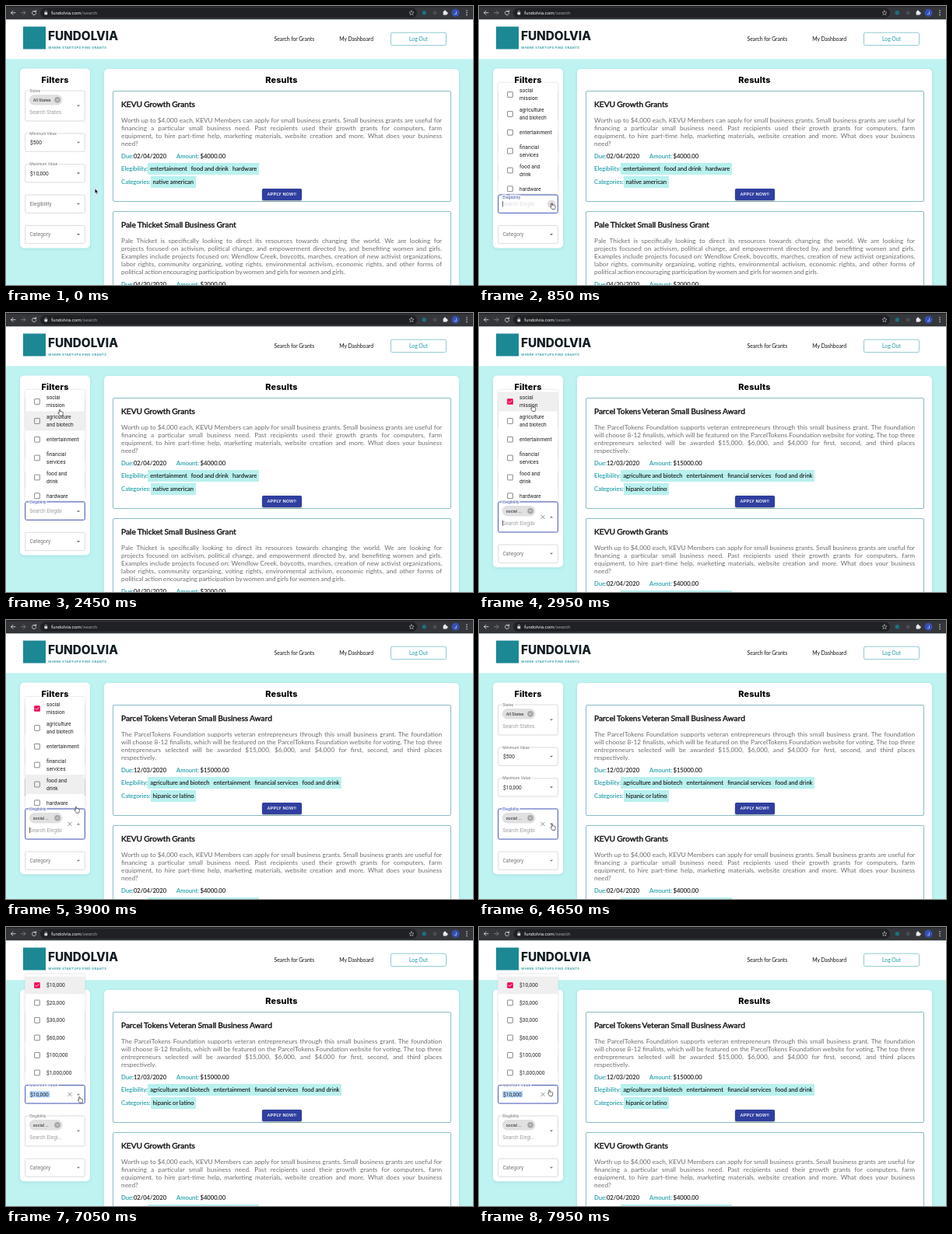
Animation of 600x359 px, one loop 8 s. Source, as an HTML page:

```html
<!DOCTYPE html>
<html lang="en">
<head>
<meta charset="utf-8">
<title>Grant search</title>
<style>
  html, body { margin: 0; width: 100%; height: 100%; overflow: hidden; }
  #stage { position: relative; width: 600px; height: 359px; overflow: hidden; background: #bff3f2; font-family: Lato, sans-serif; }
  #stage svg { position: absolute; left: 0; top: 0; }
  .panel { position: absolute; left: 126px; top: 80.5px; width: 456px; height: 300px; border-radius: 5px; background: #fff; box-shadow: 0 1px 4px rgba(40, 130, 140, .16); }
  .card { position: absolute; left: 137px; width: 434.5px; box-sizing: border-box; border: 1px solid #8abac6; border-radius: 2px; }
  .card > * { position: absolute; left: 10.1px; white-space: nowrap; }
  .card h2 { margin: 0; top: 9.8px; font-size: 10.2px; font-weight: 400; line-height: 12px; word-spacing: -.5px; color: #111; -webkit-text-stroke: .4px #111; }
  .copy { top: 31.8px; width: 412px; font-size: 8.25px; line-height: 10px; word-spacing: -.6px; color: #6c6c6c; }
  .copy div { text-align: justify; text-align-last: justify; }
  .copy div:last-child { text-align-last: left; }
  .row { font-size: 7.6px; line-height: 9px; word-spacing: -.2px; color: #111; -webkit-text-stroke: .08px; }
  .row b { font-weight: 400; color: #179aa5; }
  .tags { display: flex; line-height: 14.6px; }
  .tags span { background: #b8f1ef; padding: 0 .4px; }
  .tags i { font-style: normal; margin: 0 2.6px; }
  .card .apply { left: 191px; width: 50.5px; height: 15px; border-radius: 1.8px; background: #303f9f; color: #fff; font: 500 5.9px/15px Roboto, sans-serif; letter-spacing: .18px; text-align: center; box-shadow: 0 1px 2px rgba(0, 0, 0, .35); }
</style>
</head>
<body>
<div id="stage">
  <div class="panel"></div>
  <div id="before"></div>
  <div id="after"></div>
  <svg id="page" width="600" height="359"></svg>
  <svg id="live" width="600" height="359"></svg>
</div>
<script>
const LOOP = 8000;
const OPEN = 850, PICK = 2700, CLOSE = 4400, OPEN_MAX = 6900;
const HOVER_LAG = 100;
const INK = '#212121', GREY = '#757575', BLUE = '#3f51b5', TEAL = '#1b9ba5';
const ROBOTO = 'Roboto, sans-serif', LATO = 'Lato, sans-serif', INTER = 'Inter, sans-serif';
const $ = id => document.getElementById(id);

// Results

const growth = {
  title: 'KEVU Growth Grants', due: '02/04/2020', amount: '$4000.00',
  copy: ['Worth up to $4,000 each, KEVU Members can apply for small business grants. Small business grants are useful for',
    'financing a particular small business need. Past recipients used their growth grants for computers, farm',
    'equipment, to hire part-time help, marketing materials, website creation and more. What does your business',
    'need?'],
  who: ['entertainment', 'food and drink', 'hardware'], category: 'native american'
};
const thicket = {
  title: 'Pale Thicket Small Business Grant', due: '04/20/2020', amount: '$2000.00',
  copy: ['Pale Thicket is specifically looking to direct its resources towards changing the world. We are looking for',
    'projects focused on activism, political change, and empowerment directed by, and benefiting women and girls.',
    'Examples include projects focused on: Wendlow Creek, boycotts, marches, creation of new activist organizations,',
    'labor rights, community organizing, voting rights, environmental activism, economic rights, and other forms of',
    'political action encouraging participation by women and girls for women and girls.'],
  who: ['social mission'], category: 'women'
};
const veteran = {
  title: 'Parcel Tokens Veteran Small Business Award', due: '12/03/2020', amount: '$15000.00',
  copy: ['The ParcelTokens Foundation supports veteran entrepreneurs through this small business grant. The foundation',
    'will choose 8-12 finalists, which will be featured on the ParcelTokens Foundation website for voting. The top three',
    'entrepreneurs selected will be awarded $15,000, $6,000, and $4,000 for first, second, and third places',
    'respectively.'],
  who: ['agriculture and biotech', 'entertainment', 'financial services', 'food and drink'], category: 'hipanic or latino'
};

function card(g, top) {
  const y = g.copy.length * 10;
  const tags = (name, list, at) => `<div class="row tags" style="top:${y + at}px"><b>${name}:</b><span>${
    list.map(w => `<i>${w}</i>`).join('')}</span></div>`;
  return `<div class="card" style="top:${top}px;height:${y + 102.7}px"><h2>${g.title}</h2>
    <div class="copy">${g.copy.map(s => `<div>${s}</div>`).join('')}</div>
    <div class="row" style="top:${y + 39.2}px"><b>Due:</b>${g.due}</div>
    <div class="row" style="top:${y + 39.2}px;left:81.1px"><b>Amount:</b> ${g.amount}</div>
    ${tags('Elegibility', g.who, 52.2)}${tags('Categories', [g.category], 69.2)}
    <div class="apply" style="top:${y + 84.8}px">APPLY NOW!!</div></div>`;
}
$('before').innerHTML = card(growth, 109) + card(thicket, 264.3);
$('after').innerHTML = card(veteran, 109) + card(growth, 264.3);

// SVG helpers

const text = (x, y, s, size, fill = INK, font = ROBOTO, extra = '') =>
  `<text x="${x}" y="${y}" font-size="${size}" fill="${fill}" font-family="${font}" ${extra}>${s}</text>`;
const rect = (x, y, w, h, fill, r = 0, extra = '') =>
  `<rect x="${x}" y="${y}" width="${w}" height="${h}" rx="${r}" fill="${fill}" ${extra}/>`;
const circle = (x, y, r, fill, extra = '') => `<circle cx="${x}" cy="${y}" r="${r}" fill="${fill}" ${extra}/>`;
const line = (d, color, w = .8) =>
  `<path d="${d}" fill="none" stroke="${color}" stroke-width="${w}" stroke-linecap="round" stroke-linejoin="round"/>`;
const cross = (x, y, r, color, w) =>
  line(`M${x - r} ${y - r}l${2 * r} ${2 * r}m0 ${-2 * r}l${-2 * r} ${2 * r}`, color, w);

// Browser bar and header

const bar = rect(0, 0, 600, 17.5, '#35363a') + rect(0, 0, 600, 1.2, '#202124') + rect(44, 2.6, 484, 12.4, '#202124', 6.2) +
  line('M12 8.7H6.5M9 6.2L6.5 8.7L9 11.2', '#e8eaed') +
  line('M19.5 8.7H25M22.5 6.2L25 8.7L22.5 11.2', '#85888c') +
  line('M38.2 7.3A2.6 2.6 0 1 0 38.7 9.3M38.6 5.6V7.5H36.7', '#e8eaed') +
  rect(49.4, 8, 3.8, 3.2, '#d5d7da', .4) + line('M50.2 8V7.2a1.1 1.1 0 0 1 2.2 0V8', '#d5d7da', .6) +
  text(58, 11, 'fundolvia.com<tspan fill="#9aa0a6">/search</tspan>', 6.1, '#f1f3f4') +
  line('M521 5.8L521.9 7.8L524 8L522.4 9.4L522.9 11.5L521 10.4L519.1 11.5L519.6 9.4L518 8L520.1 7.8Z', '#c8cacd', .6) +
  circle(537.3, 8.7, 2.7, '#1d6f80') + circle(551, 8.7, 2.5, '#4a4d52') +
  rect(561.7, 7, 4.8, 4.6, '#e8eaed', .6) + circle(564, 6.6, 1.2, '#e8eaed') + circle(566.8, 9.3, 1.1, '#e8eaed') +
  circle(577.5, 8.7, 5, '#3550b5') + text(577.5, 10.8, 'J', 5.8, '#fff', ROBOTO, 'text-anchor="middle"') +
  [6, 8.7, 11.4].map(y => circle(592, y, .75, '#e8eaed')).join('');

const nav = (x, s, color = '#111', extra = '') => text(x, 45, s, 6.85, color, LATO, `word-spacing="-.25" ${extra}`);
const header = rect(0, 17.5, 600, 50.7, '#fff') + rect(22, 26.5, 29, 29, '#1b8894') +
  text(54, 43.7, 'FUNDOLVIA', 15.3, '#101c22', INTER, 'font-weight="800"') +
  text(54.3, 54.6, 'WHERE STARTUPS FIND GRANTS', 4.1, '#2b97a2', INTER, 'font-weight="600" letter-spacing=".33"') +
  nav(344.5, 'Search for Grants') + nav(428.3, 'My Dashboard') +
  rect(494.5, 34.2, 71, 16.4, 'none', 2, 'stroke="#62b3c0" stroke-width=".7"') +
  nav(530, 'Log Out', TEAL, 'text-anchor="middle"');

const heading = (x, s) => text(x, 98.6, s, 10.9, '#000', INTER, 'font-weight="800" letter-spacing=".15" text-anchor="middle"');
$('page').innerHTML = bar + header + heading(354, 'Results');

// Filter form

const ramp = (t, a, b) => Math.min(1, Math.max(0, (t - a) / (b - a)));
const easeOut = p => 1 - (1 - p) ** 3;
const smooth = p => p * p * (3 - 2 * p);

function field(f) {
  const { y, h = 23.3, lift = 1 } = f, mid = y + h / 2;
  const edge = f.focus ? BLUE : f.hover ? INK : '#c4c4c4';
  let s = rect(24.7, y, 76.6, h, '#fff', 1.8, `stroke="${edge}" stroke-width="${f.focus ? 1 : .6}"`);
  s += text(30.5 - lift * .3, mid + 2.4 + lift * (y + 1.7 - mid - 2.4), f.label, 6.67 - 1.67 * lift,
    f.focus ? BLUE : GREY, ROBOTO, lift > .5 ? 'stroke="#fff" stroke-width="2.6" paint-order="stroke"' : '');
  if (f.chip) {
    const c = y + 11.8;
    s += rect(29.8, c - 6.7, 42.6, 13.4, '#e0e0e0', 6.7) + text(34.8, c + 1.9, f.chip, 5.42) +
      circle(66, c, 3.8, '#a4a4a4') + cross(66, c, 1.3, '#e8e8e8', .7);
  }
  const base = f.chip ? y + 29.5 : mid + 2.4;
  if (f.hint) s += text(30.2, base, f.hint, 6.67, '#000', ROBOTO, `opacity="${f.hintAlpha ?? .38}"`);
  if (f.caret) s += rect(30, base - 6, .6, 7.6, '#111');
  if (f.marked) s += rect(30.3, mid - 4.2, 26, 8.2, '#b4d5fe');
  if (f.value) s += text(31, base, f.value, 6.67);
  if (f.clear) s += cross(82, mid, 2.2, GREY, .8);
  if (f.ripple) s += circle(93, mid, 5.4, '#000', `opacity="${f.ripple * .12}"`);
  const k = f.up ? -1 : 1;
  return s + `<path d="M90.9 ${mid - k}h4.2l-2.1 ${2.1 * k}z" fill="${GREY}"/>`;
}

function checkbox(y, on) {
  return on
    ? rect(36.2, y - 3.8, 7.6, 7.6, '#f50057', .9) + line(`M38 ${y + .1}l1.4 1.4l2.8 -2.9`, '#fff', .9)
    : rect(36.6, y - 3.4, 6.8, 6.8, 'none', .5, `stroke="${GREY}" stroke-width=".85"`);
}

// Rows with two words per line are taller than single-line rows.
function rows(y, labels) {
  return labels.map(label => {
    const lines = label.split('|'), h = lines.length > 1 ? 25 : 22.5;
    y += h;
    return { lines, h, top: y - h, mid: y - h / 2 };
  });
}
const kinds = rows(101.5, ['social|mission', 'agriculture|and biotech', 'entertainment', 'financial|services', 'food and|drink', 'hardware']);
const limits = rows(63.7, ['$10,000', '$20,000', '$30,000', '$60,000', '$100,000', '$1,000,000']);

function popup(top, bottom, list, lit, checked) {
  let s = rect(24.6, top, 76.8, bottom - top, '#fff', 1.6, 'style="filter:drop-shadow(0 .6px 1.2px rgba(0,0,0,.2))"');
  list.forEach((r, i) => {
    if (i === lit) s += rect(24.6, r.top, 76.8, Math.min(r.h, bottom - r.top), '#efefef');
    s += checkbox(r.mid, i === checked);
    r.lines.forEach((w, n) => {
      s += text(52, r.mid + 2.3 + (n - (r.lines.length - 1) / 2) * 10, w, 6.67);
    });
  });
  return s;
}

// Pointer: time, x, y of its tip
const path = [[0, 114.3, 235], [50, 114.3, 235], [600, 93.8, 253.5], [1600, 93.8, 253.5], [2450, 69, 124.2],
  [2620, 68.5, 118.5], [3300, 68.5, 118.5], [4100, 94, 262.5], [5000, 94, 262.5], [5800, 94.5, 218.5],
  [7000, 94.5, 218.5], [7500, 90.5, 209.5], [LOOP, 90.5, 209.5]];

function pointerAt(t) {
  const i = path.findIndex(k => k[0] > t), a = path[i - 1], b = path[i];
  const p = smooth(ramp(t, a[0], b[0]));
  return { x: a[1] + (b[1] - a[1]) * p, y: a[2] + (b[2] - a[2]) * p };
}

const HAND = 'M-.7 .5Q0-.4 .7 .5V2.8Q1.4 2.2 2 2.9Q2.7 2.4 3.2 3.2Q4 2.9 4.2 3.8V5.4Q4.1 6.8 3.5 8H.3Q-.8 6.4-2.1 4.6Q-1.8 3.4-.7 4.4Z';
const ARROW = 'M0 0V6L1.4 4.8L2.3 6.9L3.3 6.5L2.4 4.5H4.2Z';
function cursor({ x, y }) {
  const hand = x < 101.3;
  return `<path transform="translate(${x} ${y})" d="${hand ? HAND : ARROW}" fill="${hand ? '#fff' : '#000'}" stroke="${
    hand ? '#111' : '#fff'}" stroke-width="${hand ? .6 : .4}" stroke-linejoin="round"/>`;
}

function render(t) {
  const over = pointerAt(Math.max(0, t - HOVER_LAG));
  const inside = (y, h) => over.x < 101.3 && over.y > y && over.y < y + h;
  const picked = t >= PICK, grow = picked ? 15.7 : 0;
  const kindOpen = t >= OPEN && t < CLOSE, maxOpen = t >= OPEN_MAX;
  const focus = t >= OPEN && !maxOpen;
  const lift = t < OPEN ? 0 : easeOut(ramp(t, 780, 980));
  const ripple = t < OPEN ? 0 : t < CLOSE ? 1 - ramp(t, OPEN, 1400) : 1 - ramp(t, CLOSE, 4620);
  const overMax = inside(203.7, 23.3);

  let s = rect(18, 80.5, 90, 231 + grow, '#fff', 5, 'style="filter:drop-shadow(0 1px 2px rgba(40,130,140,.16))"');
  s += heading(63, 'Filters');
  s += field({ y: 109, h: 39, label: 'States', chip: 'All States', hint: 'Search States' });
  s += field({ y: 164, label: 'Minimum Value', value: '$500' });
  s += field({ y: 203.7, label: 'Maximum Value', value: '$10,000', focus: maxOpen, marked: maxOpen, up: maxOpen,
    hover: overMax, clear: maxOpen || overMax });
  s += field({ y: 243, h: 23.3 + grow, label: 'Elegibility', lift, focus, hover: inside(243, 23.3 + grow),
    chip: picked && 'social ...', clear: picked && focus, up: kindOpen, ripple,
    hint: t >= OPEN && (maxOpen ? 'Search Elegi...' : 'Search Elegibi'),
    hintAlpha: .38 * ramp(t, 780, 980), caret: focus && (t - OPEN) % 1000 < 500 });
  s += field({ y: 282.4 + grow, label: 'Category', lift: 0 });

  if (kindOpen) {
    const entered = over.y < 241 || picked;
    const lit = entered ? kinds.findIndex(r => Math.min(over.y, 240) < r.top + r.h) : -1;
    s += popup(99, 241.4, kinds, lit, picked ? 0 : -1);
  }
  if (maxOpen) s += popup(60.4, 202.6, limits, 0, 0);
  $('live').innerHTML = s + cursor(pointerAt(t));
  $('before').hidden = picked;
  $('after').hidden = !picked;
}

const start = performance.now();
function tick(now) {
  render(Math.max(0, now - start) % LOOP);
  requestAnimationFrame(tick);
}
render(0);
requestAnimationFrame(tick);
</script>
</body>
</html>
```
